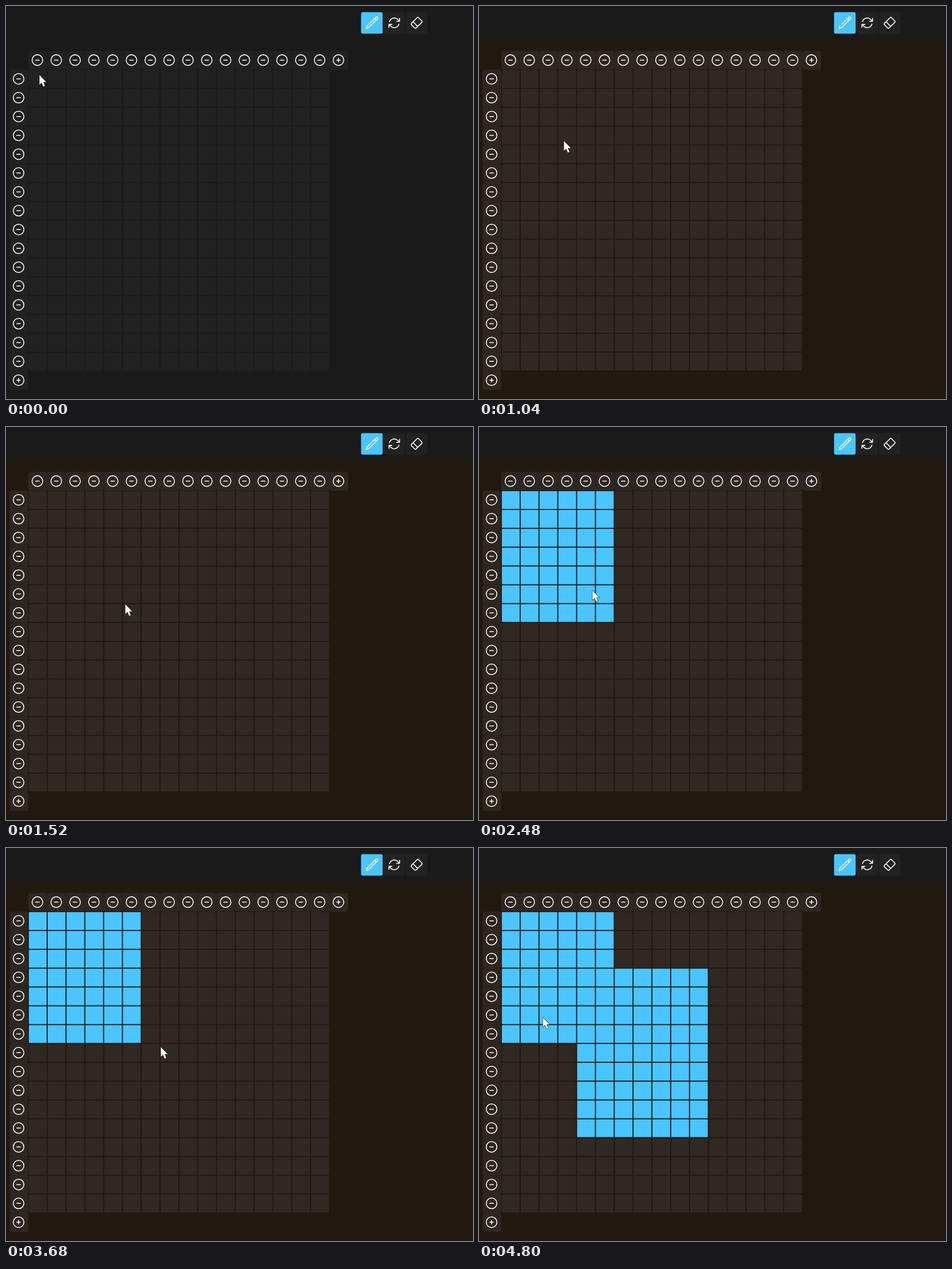
Animation of 816x686 px, one loop 4.88 s. Source, as an HTML page with a canvas:

```html
<!DOCTYPE html>
<html lang="en">
<head>
<meta charset="utf-8">
<title>Grid editor</title>
<style>
  html, body { margin: 0; width: 100%; height: 100%; overflow: hidden; background: #1a1a1a; }
  canvas { display: block; }
</style>
</head>
<body>
<canvas id="stage"></canvas>
<script>
const W = 816, H = 686, LOOP = 4880, STEP = 80;
const N = 16, PITCH = 32.875, CELL = 31;
const GRID_X = 40, GRID_Y = 112;
const BLUE = '#4ac5ff';
const ICON = 1.03;

const canvas = document.getElementById('stage');
const ratio = window.devicePixelRatio || 1;
canvas.width = W * ratio;
canvas.height = H * ratio;
canvas.style.width = W + 'px';
canvas.style.height = H + 'px';
const ctx = canvas.getContext('2d');
ctx.scale(ratio, ratio);

// Icons are drawn in a box of 24 units.
const pencil = new Path2D('M16.9 4.5l1.7-1.7a1.9 1.9 0 1 1 2.6 2.6L6.8 19.8a4.5 4.5 0 0 1-1.9 1.1l-2.7.8.8-2.7a4.5 4.5 0 0 1 1.1-1.9zm0 0l2.6 2.6');
const halfTurn = new Path2D('M4 9.9a8.25 8.25 0 0 1 13.8-3.7L21 9.35m0-5v5h-5');
const minus = new Path2D('M8.8 12h6.4M21 12a9 9 0 1 1-18 0a9 9 0 0 1 18 0z');
const upright = new Path2D('M12 8.8v6.4');
const eraser = new Path2D();
eraser.roundRect(3.5, 6.4, 17, 11.2, 1.5);
eraser.moveTo(9, 6.4);
eraser.lineTo(9, 17.6);
const arrow = new Path2D('M0 0V16.4L3.7 13l2.9 6.6 2.7-1.2-2.8-6.5h5.2z');

// Pointer moves: start, end, x, y.
const moves = [
  [80, 480, 59, 126],
  [640, 1520, 208, 309],
  [2400, 2800, 172, 224],
  [2960, 3200, 177, 227],
  [3360, 3680, 270, 347],
  [3680, 3760, 338, 464],
  [4240, 4320, 130, 298],
  [4400, 4800, 111, 295]
];

// A drag paints the block of cells: start, column, row, columns, rows.
const blocks = [[1600, 0, 0, 6, 7], [3760, 4, 3, 7, 9]];

function pointerAt(t) {
  let x = 58, y = 120;
  for (const [start, end, toX, toY] of moves) {
    const k = Math.min(1, Math.max(0, (t - start) / (end - start)));
    const eased = 1 - (1 - k) ** 1.5;
    x += (toX - x) * eased;
    y += (toY - y) * eased;
  }
  return [x, y];
}

function painted(t, c, r) {
  return blocks.some(([start, c0, r0, cols, rows]) =>
    t >= start && c >= c0 && c < c0 + cols && r >= r0 && r < r0 + rows);
}

function roundBox(x, y, w, h, r, fill) {
  ctx.fillStyle = fill;
  ctx.beginPath();
  ctx.roundRect(x, y, w, h, r);
  ctx.fill();
}

function icon(shape, x, y, angle = 0) {
  ctx.save();
  ctx.translate(x, y);
  ctx.rotate(angle);
  ctx.scale(ICON, ICON);
  ctx.translate(-12, -12);
  ctx.stroke(shape);
  ctx.restore();
}

function stepper(x, y, plus, fill) {
  roundBox(x, y, PITCH, PITCH, 4, fill);
  icon(minus, x + 15.9, y + 16.1);
  if (plus) icon(upright, x + 15.9, y + 16.1);
}

function toolbar() {
  for (let i = 0; i < 3; i++)
    roundBox(620.4 + i * 39.1, 10.7, 37.7, 37.5, 3, i ? '#222222' : BLUE);
  icon(pencil, 639.3, 29.4);
  icon(halfTurn, 678.4, 29.4);
  icon(halfTurn, 678.4, 29.4, Math.PI);
  icon(eraser, 717.5, 29.4, -Math.PI / 4);
}

function pointer(x, y) {
  ctx.save();
  ctx.translate(x + 0.6, y + 0.8);
  ctx.lineWidth = 1.4;
  ctx.strokeStyle = '#2c2c2c';
  ctx.stroke(arrow);
  ctx.fillStyle = '#fff';
  ctx.fill(arrow);
  ctx.restore();
}

function draw(t) {
  const warm = t >= STEP;
  const panel = warm ? '#2e2620' : '#212121';
  const blank = warm ? '#302822' : '#212121';

  ctx.fillStyle = '#1a1a1a';
  ctx.fillRect(0, 0, W, H);
  if (warm) {
    ctx.fillStyle = '#21190f';
    ctx.fillRect(0, 59.5, W, H);
  }

  ctx.strokeStyle = '#fff';
  ctx.lineWidth = 1.5;
  ctx.lineCap = ctx.lineJoin = 'round';
  toolbar();

  for (let i = 0; i <= N; i++) {
    stepper(39 + i * PITCH, 78.3, i === N, panel);
    stepper(6.1, 111.1 + i * PITCH, i === N, panel);
  }

  for (let r = 0; r < N; r++)
    for (let c = 0; c < N; c++) {
      ctx.fillStyle = painted(t, c, r) ? BLUE : blank;
      ctx.fillRect(GRID_X + c * PITCH, GRID_Y + r * PITCH, CELL, CELL);
    }

  pointer(...pointerAt(t));
}

const begin = performance.now();
function tick() {
  const t = (performance.now() - begin) % LOOP;
  draw(Math.floor(t / STEP) * STEP);
  requestAnimationFrame(tick);
}
tick();
</script>
</body>
</html>
```
